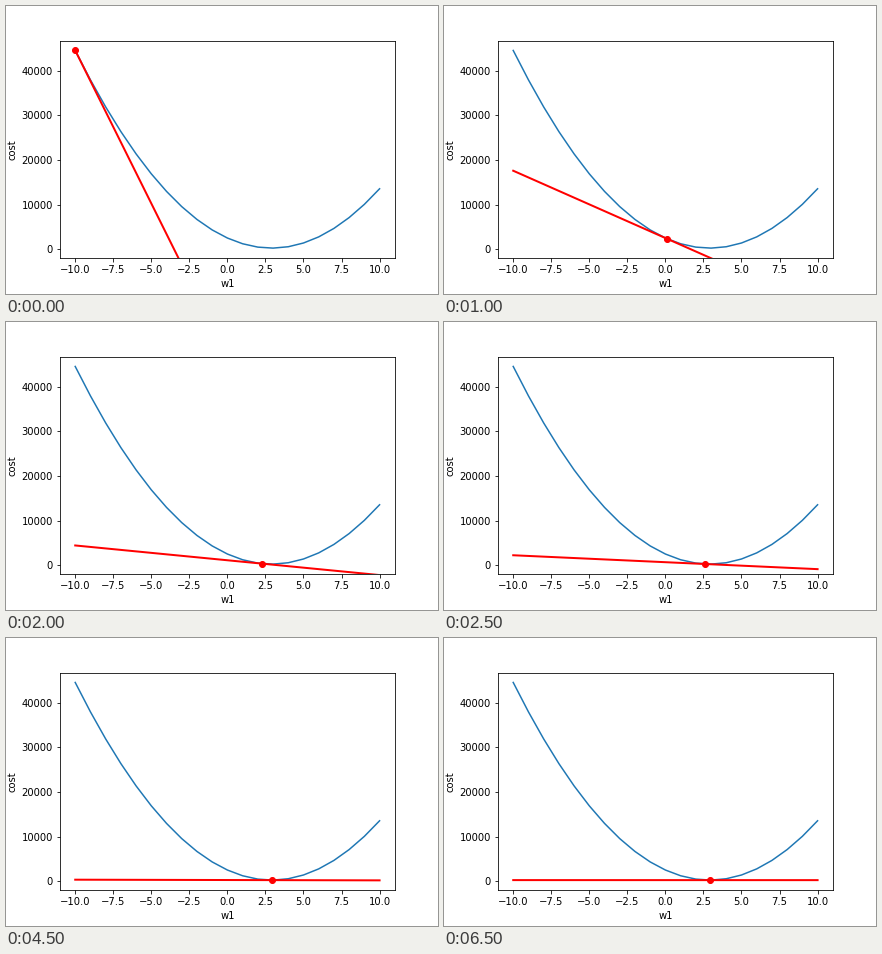
A matplotlib script for the animation above (7.5 s loop, 432 by 288 pixels).

```python
import matplotlib.pyplot as plt
import numpy as np
from matplotlib.animation import FuncAnimation

FRAMES, INTERVAL = 15, 500
START, RATE = -10, 0.001

# Quadratic cost: CURVE * (w - BEST)^2 + FLOOR
CURVE, BEST, FLOOR = 265.5, 2.92, 220


def cost(w):
    return CURVE * (w - BEST) ** 2 + FLOOR


def slope(w):
    return 2 * CURVE * (w - BEST)


def descend(steps):
    w = START
    for _ in range(steps):
        w -= RATE * slope(w)
    return w


plt.rcParams["font.family"] = "DejaVu Sans"
fig, ax = plt.subplots(figsize=(6, 4), dpi=72, facecolor="white")
fig.subplots_adjust(left=0.125, right=0.9, bottom=0.125, top=0.88)

grid = np.arange(-10, 11)
ax.plot(grid, cost(grid), color="#1f77b4", lw=1.5)
ax.set(xlabel="w1", ylabel="cost", xlim=ax.get_xlim(), ylim=ax.get_ylim())

tangent, = ax.plot([], [], color="red", lw=2)
point, = ax.plot([], [], "o", color="red", ms=6)
ends = np.array([-10, 10])


def update(step):
    w = descend(step)
    tangent.set_data(ends, cost(w) + slope(w) * (ends - w))
    point.set_data([w], [cost(w)])
    return tangent, point


anim = FuncAnimation(fig, update, frames=FRAMES, interval=INTERVAL,
                     repeat=True, repeat_delay=0, blit=False)
plt.show()
```
